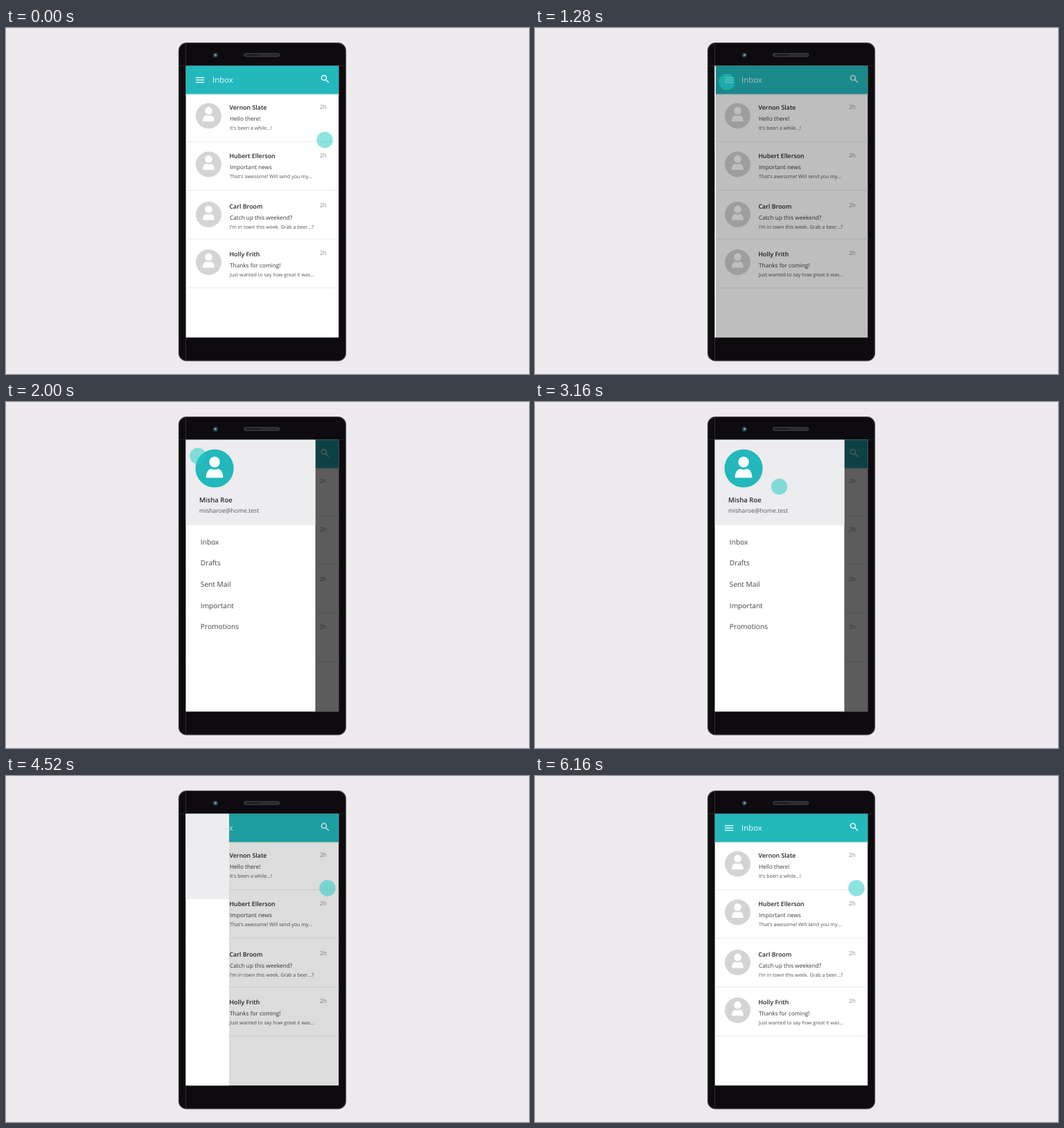
Write an HTML page with a canvas that moves like this. It is 755 px wide and 500 px high and loops after 6.52 s.

```html
<!DOCTYPE html>
<html lang="en">
<head>
<meta charset="utf-8">
<title>Mail drawer</title>
<style>
html, body { margin: 0; width: 100%; height: 100%; overflow: hidden; background: #eceaed; }
canvas { display: block; }
</style>
</head>
<body>
<canvas id="stage" width="755" height="500"></canvas>
<script>
const canvas = document.getElementById('stage');
const ratio = window.devicePixelRatio || 1;
canvas.width = 755 * ratio;
canvas.height = 500 * ratio;
canvas.style.width = '755px';
canvas.style.height = '500px';
const ctx = canvas.getContext('2d');
ctx.scale(ratio, ratio);
ctx.textRendering = 'geometricPrecision';

const LOOP = 6520;
const SCREEN = { x: 259.5, y: 54.5, w: 221, h: 393 };
const DRAWER_W = 187;
const TEAL = '#22b8bc';
const MAILS = [
  { y: 127, line: 164.3, name: 'Vernon Slate', subject: 'Hello there!', preview: "It's been a while\u2026!" },
  { y: 197, line: 234.5, name: 'Hubert Ellerson', subject: 'Important news', preview: "That's awesome! Will send you my\u2026" },
  { y: 269.5, line: 305, name: 'Carl Broom', subject: 'Catch up this weekend?', preview: "I'm in town this week. Grab a beer\u2026?" },
  { y: 338.5, line: 375.7, name: 'Holly Frith', subject: 'Thanks for coming!', preview: 'Just wanted to say how great it was\u2026' }
];
const MENU = ['Inbox', 'Drafts', 'Sent Mail', 'Important', 'Promotions'];

const progress = (t, from, to) => Math.min(1, Math.max(0, (t - from) / (to - from)));
const easeOut = p => 1 - (1 - p) ** 2;
const easeInOut = p => p < 0.5 ? 2 * p * p : 1 - 2 * (1 - p) ** 2;

// cubic-bezier(.4, 0, .38, 1), solved by bisection
function glide(x) {
  let lo = 0, hi = 1, p = 0.5;
  for (let i = 0; i < 24; i++) {
    p = (lo + hi) / 2;
    const bx = 1.2 * p * (1 - p) ** 2 + 1.14 * p * p * (1 - p) + p ** 3;
    if (bx < x) lo = p; else hi = p;
  }
  return p * p * (3 - 2 * p);
}

function rect(x, y, w, h, color) {
  ctx.fillStyle = color;
  ctx.fillRect(x, y, w, h);
}

function rounded(x, y, w, h, r, fill, stroke, width = 1) {
  ctx.beginPath();
  ctx.roundRect(x, y, w, h, r);
  ctx.fillStyle = fill;
  ctx.fill();
  if (stroke) {
    ctx.strokeStyle = stroke;
    ctx.lineWidth = width;
    ctx.stroke();
  }
}

function disc(x, y, r, color) {
  ctx.beginPath();
  ctx.arc(x, y, r, 0, Math.PI * 2);
  ctx.fillStyle = color;
  ctx.fill();
}

function text(string, x, y, size, color, weight = 400) {
  ctx.font = `${weight} ${size}px "Open Sans", "Noto Sans", sans-serif`;
  ctx.fillStyle = color;
  ctx.fillText(string, x, y);
}

function avatar(x, y, r, color, scale, drop) {
  disc(x, y, r, color);
  ctx.save();
  ctx.translate(x, y + drop);
  ctx.scale(scale, scale);
  disc(0, -7.6, 5.3, '#fff');
  ctx.beginPath();
  ctx.moveTo(-8.5, 8);
  ctx.bezierCurveTo(-8.5, 2, -6, -0.8, -3, -0.8);
  ctx.quadraticCurveTo(0, 0.6, 3, -0.8);
  ctx.bezierCurveTo(6, -0.8, 8.5, 2, 8.5, 8);
  ctx.fill();
  ctx.restore();
}

function drawPhone() {
  rect(0, 0, 755, 500, '#eceaed');
  rounded(249.5, 21.7, 241, 459.2, 11, '#0d0b0e', '#454146', 1.2);
  rect(259, 23, 0.8, 457, '#39353a');
  rect(250, 54, 240, 0.7, '#2c292d');
  rounded(343.5, 36.8, 51.5, 4.4, 2.2, '#29282a', '#49474a', 0.9);
  rect(347, 38.4, 20, 1.2, '#131214');
  disc(302.3, 39.2, 3.7, '#29303a');
  disc(302.3, 39.2, 2.3, '#39616b');
  disc(302.6, 38.8, 1, '#a3d4d8');
}

function drawAppBar() {
  rect(SCREEN.x, SCREEN.y, SCREEN.w, 40.5, TEAL);
  rect(SCREEN.x, 95, SCREEN.w, 1, '#9bd2d4');
  rect(SCREEN.x, 96, SCREEN.w, 1, '#ebf2f2');
  for (const y of [71, 74.4, 77.8]) rect(274, y, 12.2, 1.4, '#e9fafa');
  text('Inbox', 298, 79, 11.4, '#f2fdfd', 500);
  ctx.beginPath();
  ctx.arc(459, 72, 3.5, 0, Math.PI * 2);
  ctx.moveTo(461.7, 74.7);
  ctx.lineTo(466, 79);
  ctx.strokeStyle = '#e9fafa';
  ctx.lineWidth = 1.6;
  ctx.stroke();
}

function drawInbox() {
  rect(SCREEN.x, SCREEN.y, SCREEN.w, SCREEN.h, '#fff');
  for (const { y, line, name, subject, preview } of MAILS) {
    avatar(292.5, y, 18.5, '#d6d3d7', 1, 0);
    text(name, 322.5, y - 8.7, 8.8, '#262427', 600);
    text(subject, 323, y + 7.2, 8.25, '#3a383b');
    text(preview, 323, y + 20, 7.15, '#555356');
    text('2h', 453, y - 10.4, 8.4, '#8f8c90');
    rect(SCREEN.x, line - 0.5, SCREEN.w, 1, '#ebe9ec');
  }
  drawAppBar();
}

function drawDrawer(offset) {
  ctx.save();
  ctx.translate(SCREEN.x + offset, 0);
  rect(0, SCREEN.y, DRAWER_W, SCREEN.h, '#fff');
  rect(0, SCREEN.y, DRAWER_W, 123.5, '#edecee');
  avatar(41.6, 96, 27.6, TEAL, 1.45, 1.8);
  text('Misha Roe', 19.5, 145, 9.6, '#2b292c', 600);
  text('misharoe@home.test', 19.5, 160, 8.65, '#58565a');
  MENU.forEach((label, i) => text(label, 21.3, 205.6 + i * 30.7, 10.2, '#454346', 500));
  ctx.restore();
}

function drawPointer(t) {
  const s = t < 2000 ? 1 - glide(progress(t, -100, 980)) : glide(progress(t, 2760, 3840));
  const x = 277 + 187 * s;
  const y = 162 - 84 * (1 - s) ** 1.45;
  disc(x, y, 11.7, 'rgba(34, 203, 200, 0.52)');
}

function draw(t) {
  const opening = t < 3000;
  const open = opening
    ? easeInOut(progress(t, 1255, 1665))
    : 1 - easeInOut(progress(t, 4255, 4705));
  const shade = opening
    ? easeOut(progress(t, 1180, 1630))
    : 1 - progress(t, 4250, 4595);

  drawPhone();
  ctx.save();
  ctx.beginPath();
  ctx.rect(SCREEN.x, SCREEN.y, SCREEN.w, SCREEN.h);
  ctx.clip();
  drawInbox();
  rect(SCREEN.x, SCREEN.y, SCREEN.w, SCREEN.h, `rgba(0, 0, 0, ${0.64 * shade})`);
  if (open > 0) drawDrawer((open - 1) * DRAWER_W);
  drawPointer(t);
  ctx.restore();
}

const start = performance.now();
function tick() {
  draw((performance.now() - start) % LOOP);
  requestAnimationFrame(tick);
}
tick();
</script>
</body>
</html>
```
